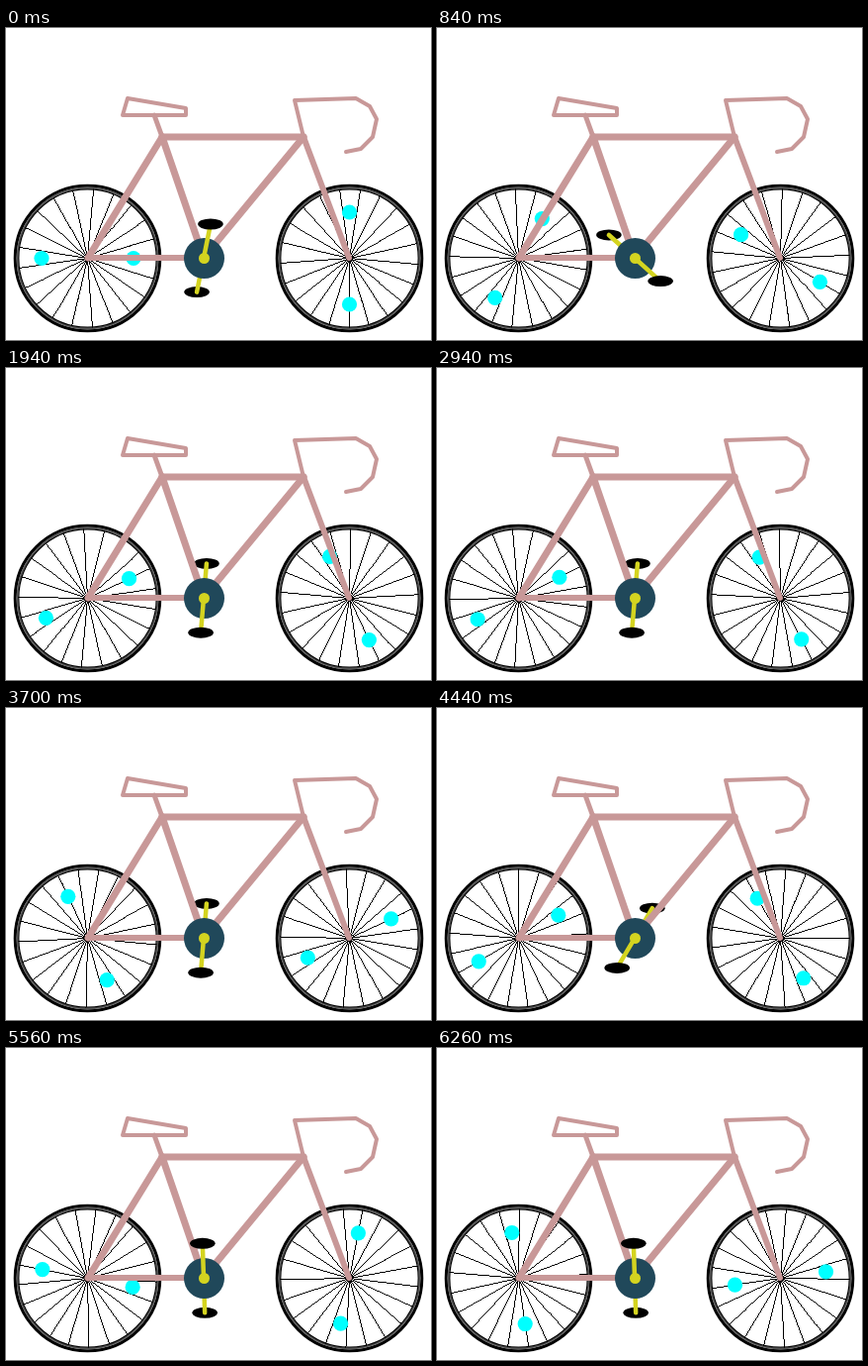
Animation, 430 px wide and 315 px high, one loop 6.28 s. Source, as an HTML page with a canvas:

```html
<!DOCTYPE html>
<html>
<head>
<meta charset="utf-8">
<style>
html, body { margin: 0; width: 100%; height: 100%; overflow: hidden; background: #fff; }
canvas { display: block; }
</style>
</head>
<body>
<canvas id="stage" width="430" height="315"></canvas>
<script>
const ctx = document.getElementById('stage').getContext('2d');
const TAU = Math.PI * 2;
const STEP_MS = 20, STEPS = 314;
const PINK = '#c89898', YELLOW = '#d4d420', TEAL = '#20485a';
const HUB_Y = 232, REAR_X = 82.5, FRONT_X = 347.5;
const CRANK = { x: 200, y: 232.3, len: 35 };

function disc(x, y, rx, ry, color) {
  ctx.fillStyle = color;
  ctx.beginPath();
  ctx.ellipse(x, y, rx, ry, 0, 0, TAU);
  ctx.fill();
}

function ring(x, y, r, width, color) {
  ctx.strokeStyle = color;
  ctx.lineWidth = width;
  ctx.beginPath();
  ctx.arc(x, y, r, 0, TAU);
  ctx.stroke();
}

function path(points, width, color, closed) {
  ctx.strokeStyle = color;
  ctx.lineWidth = width;
  ctx.lineCap = ctx.lineJoin = 'round';
  ctx.beginPath();
  points.forEach(p => ctx.lineTo(p[0], p[1]));
  if (closed) ctx.closePath();
  ctx.stroke();
}

// Crisp one-pixel line
function hairline(x0, y0, x1, y1) {
  const dx = x1 - x0, dy = y1 - y0;
  const n = Math.ceil(Math.max(Math.abs(dx), Math.abs(dy)));
  ctx.fillStyle = '#000';
  for (let i = 0; i <= n; i++) {
    ctx.fillRect(Math.floor(x0 + dx * i / n), Math.floor(y0 + dy * i / n), 1, 1);
  }
}

function wheel(x, angle) {
  const y = HUB_Y + 0.5;
  for (let a = 0; a < TAU; a += 0.3) {
    hairline(x, y, x + 70 * Math.cos(angle + a), y + 70 * Math.sin(angle + a));
  }
  for (const side of [-1, 1]) {
    disc(x + side * 46.5 * Math.cos(angle), y + side * 46.5 * Math.sin(angle), 7.6, 7.6, '#00ffff');
  }
  ring(x, y, 73.3, 3, '#000');
  ring(x, y, 71, 1.8, '#555');
  ring(x, y, 69.7, 1.2, '#000');
}

function frame() {
  const seat = [158, 110], head = [301, 110], bottom = [200, 232];
  const rear = [83, 232], front = [347, 232];
  path([rear, seat], 7, PINK);
  path([rear, bottom], 6, PINK);
  path([seat, bottom], 7, PINK);
  path([seat, head], 7, PINK);
  path([head, bottom], 7, PINK);
  path([head, front], 6, PINK);
  path([seat, [150, 88]], 5, PINK);
  path([[123, 71], [182, 81], [182, 88], [118, 88]], 4, PINK, true);
  path([head, [292, 73], [354, 71], [368, 79], [375, 92], [371, 110], [359, 122], [344, 125]], 4, PINK);
}

function crankEnd(angle) {
  return [CRANK.x + CRANK.len * Math.sin(angle), CRANK.y - CRANK.len * Math.cos(angle)];
}

function arm(end) {
  path([[CRANK.x, CRANK.y], end], 4.5, YELLOW);
}

function pedal(end) {
  disc(end[0], end[1], 12.8, 5.5, '#000');
}

const clamp = (v, max) => Math.max(0, Math.min(v, max));

// Pedalling comes in two spells with coasting after each
function crankAngle(n) {
  return 0.2 + 0.05 * (clamp(n, 60.5) + clamp(n - 213, 60.5));
}

function draw(n) {
  ctx.fillStyle = '#fff';
  ctx.fillRect(0, 0, 430, 315);

  const spin = n * 0.125;
  wheel(REAR_X, spin);
  wheel(FRONT_X, spin + Math.PI / 2);

  const turn = crankAngle(n);
  const near = crankEnd(turn), far = crankEnd(turn + Math.PI);
  pedal(far);
  arm(far);
  frame();
  disc(200.5, 232.5, 20.5, 20.5, TEAL);
  arm(near);
  disc(200.5, 232.5, 5.5, 5.5, YELLOW);
  pedal(near);
}

const start = performance.now();
function tick() {
  draw(Math.floor((performance.now() - start) / STEP_MS) % STEPS);
  requestAnimationFrame(tick);
}
tick();
</script>
</body>
</html>
```
